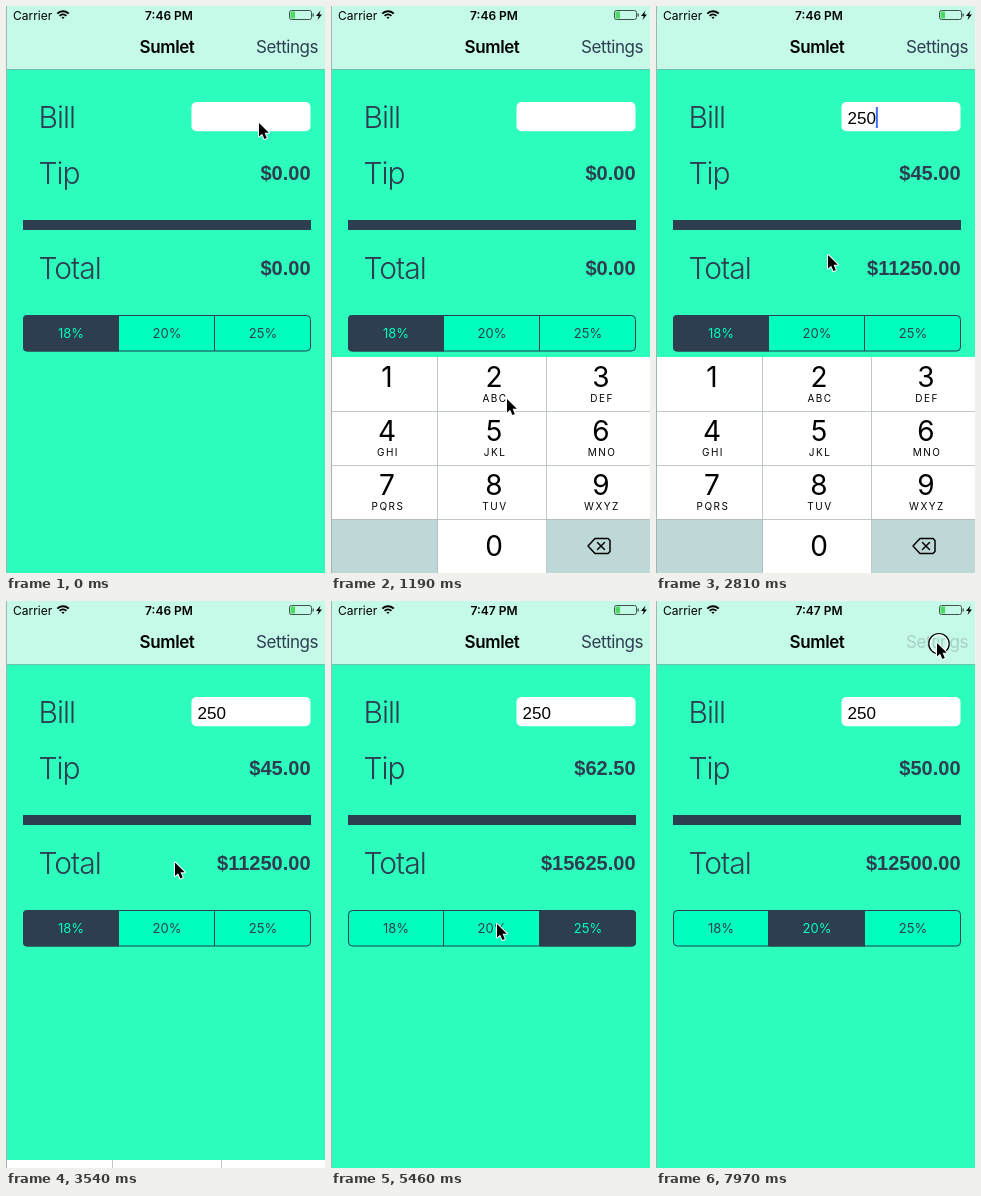
An HTML page with a canvas for the animation above (8 s loop, 319 px wide and 567 px high).

```html
<!DOCTYPE html>
<html lang="en">
<head>
<meta charset="utf-8">
<title>Tip calculator</title>
<style>
  html, body { margin: 0; width: 100%; height: 100%; overflow: hidden; background: #2cfdbd; }
  canvas { display: block; width: 319px; height: 567px; }
</style>
</head>
<body>
<canvas id="stage"></canvas>
<script>
const W = 319, H = 567, LOOP = 8000, STEP = 147.6;
const MINT = '#2cfdbd', LIGHT = [0, 255, 190], DARK = [44, 62, 80];
const INK = 'rgb(44,62,80)', HAIR = '#b3b9b9', GREY = '#bdd8d7';
const UI = 'Inter, "Open Sans", sans-serif';
const HELV = '"Liberation Sans", Arial, sans-serif';
const RATES = [0.18, 0.20, 0.25];
const LETTERS = ['', 'ABC', 'DEF', 'GHI', 'JKL', 'MNO', 'PQRS', 'TUV', 'WXYZ'];
const KEY_TOP = 351, KEY_H = 54, SEG_TOP = 309, SEG_W = 96;

const canvas = document.getElementById('stage');
const c = canvas.getContext('2d');
const dpr = window.devicePixelRatio || 1;
canvas.width = Math.round(W * dpr);
canvas.height = Math.round(H * dpr);

const keyLeft = col => 1 + Math.round(col * 107.5 - (col === 1 ? 2 : 0));
const keyMid = col => 56 + col * 107;
const digitCell = d => d ? [(d - 1) % 3, Math.floor((d - 1) / 3)] : [1, 3];

// everything that happens follows from these taps
const tap = (at, x, y, act = {}) => ({ at, x, y, ...act });
const keyTap = (at, digit) => {
  const [col, row] = digitCell(digit);
  return tap(at, keyMid(col) + 13, KEY_TOP + row * KEY_H + 42, { digit });
};
const segTap = (at, seg, dx = 0, dy = 0) =>
  tap(at, 60 + seg * SEG_W + dx, 324 + dy, { seg });

const TAPS = [
  tap(1, 253, 117, { focus: true }),
  keyTap(9, 2), keyTap(12, 5), keyTap(15, 0),
  tap(22, 172, 247, { blur: true }),
  segTap(30, 1), segTap(34, 2), segTap(38, 1, 10, -1), segTap(43, 0), segTap(46, 1, 1, -7),
  tap(54, 281, 42, { settings: true })
];
const focusAt = TAPS.find(e => e.focus).at;
const blurAt = TAPS.find(e => e.blur).at;
const picks = [{ at: -9, seg: 0 }, ...TAPS.filter(e => 'seg' in e)];

const clamp = u => Math.max(0, Math.min(1, u));
const smooth = u => { u = clamp(u); return u * u * (3 - 2 * u); };
const easeOut = u => 1 - (1 - clamp(u)) ** 3;
const mix = (a, b, p) => 'rgb(' + a.map((v, i) => Math.round(v + (b[i] - v) * p)).join(',') + ')';

function text(s, x, y, font, color, align = 'left', spacing = 0) {
  c.font = font;
  c.fillStyle = color;
  c.textAlign = align;
  c.letterSpacing = spacing + 'px';
  c.fillText(s, x, y);
  c.letterSpacing = '0px';
}

function rect(x, y, w, h, color) {
  c.fillStyle = color;
  c.fillRect(x, y, w, h);
}

function roundRect(x, y, w, h, r) {
  c.beginPath();
  c.roundRect(x, y, w, h, r);
}

function poly(...pts) {
  c.beginPath();
  for (const [x, y] of pts) c.lineTo(x, y);
}

function stroke(color, width) {
  c.strokeStyle = color;
  c.lineWidth = width;
  c.stroke();
}

function ring(x, y, r, color, width) {
  c.beginPath();
  c.arc(x, y, r, 0, Math.PI * 2);
  stroke(color, width);
}

function statusBar(n) {
  rect(0, 0, W, 63, '#c5f9e8');
  rect(0, 63, W, 1, '#6cc3a6');
  text('Carrier', 7, 14, '12px ' + UI, '#000');
  text(n < 27 ? '7:46 PM' : '7:47 PM', 163, 14, '600 12px ' + UI, '#000', 'center');

  for (const r of [1.2, 4.6, 7.8]) {
    c.beginPath();
    c.arc(57, 13, r, -Math.PI * 0.76, -Math.PI * 0.24);
    stroke('#000', 1.9);
  }

  roundRect(283.5, 4.5, 22, 9, 2);
  stroke('#40534d', 1);
  rect(284.5, 5.5, 4.5, 7, '#4cd964');
  rect(306.5, 7.5, 1.3, 3, '#40534d');
  c.fillStyle = '#000';
  poly([314.5, 4.5], [310, 10], [312.7, 10], [311.5, 14], [316, 8.4], [313.3, 8.4]);
  c.fill();

  const pressed = TAPS.some(e => e.settings && n >= e.at);
  text('Sumlet', 161, 47, '600 17px ' + UI, '#000', 'center', -0.4);
  text('Settings', 312, 47, '17px ' + UI, pressed ? '#a8cfc6' : INK, 'right', -0.45);
}

function segments(n) {
  const k = picks.findLastIndex(e => e.at <= n);
  const { at, seg } = picks[k];
  const last = k ? picks[k - 1].seg : seg;
  const p = smooth((n - at + 1) * 0.42);

  c.save();
  roundRect(17, SEG_TOP, 288, 36.5, 4);
  c.clip();
  RATES.forEach((rate, i) => {
    const on = i === seg ? p : i === last ? 1 - p ** 1.5 : 0;
    rect(17 + i * SEG_W, SEG_TOP, SEG_W, 37, mix(LIGHT, DARK, on));
    text(Math.round(rate * 100) + '%', 65 + i * SEG_W, 332, '13px ' + UI,
      mix(DARK, LIGHT, on), 'center');
  });
  c.restore();
  roundRect(17.5, SEG_TOP + 0.5, 287, 35.5, 4);
  stroke(INK, 1);
  for (const i of [1, 2]) rect(16 + i * SEG_W, SEG_TOP, 1, 36, INK);
  return RATES[seg];
}

function form(n) {
  const label = (s, y) => text(s, 32.5, y, '300 30px ' + UI, INK, 'left', -1);
  label('Bill', 122);
  label('Tip', 178);
  label('Total', 273);
  rect(17, 214, 288, 10, INK);

  c.fillStyle = '#fff';
  roundRect(185.5, 96, 119, 29.3, 5);
  c.fill();

  const typed = TAPS.filter(e => 'digit' in e && e.at < n).map(e => e.digit).join('');
  text(typed, 191.5, 117.5, '17px ' + HELV, '#000');
  const blinkOff = n > focusAt + 4 && n < focusAt + 8;
  if (n > focusAt + 1 && n < blurAt && !blinkOff) {
    rect(191.5 + c.measureText(typed).width, 101, 2, 21, '#426bf2');
  }

  const bill = Number(typed);
  const tip = bill * segments(n);
  const amount = (v, y) => text('$' + v.toFixed(2), 304.5, y, 'bold 20px ' + HELV, INK, 'right');
  amount(tip, 174);
  amount(bill * tip, 269);
}

function deleteIcon(x, y) {
  c.lineJoin = c.lineCap = 'round';
  poly([x - 11, y], [x - 4, y - 7.5], [x + 9, y - 7.5], [x + 11, y - 5.5],
    [x + 11, y + 5.5], [x + 9, y + 7.5], [x - 4, y + 7.5]);
  c.closePath();
  stroke('#000', 1.5);
  for (const s of [-1, 1]) {
    poly([x - 1.5, y - 3.5 * s], [x + 5.5, y + 3.5 * s]);
    stroke('#000', 1.5);
  }
  c.lineCap = 'butt';
}

function keyboard(n) {
  const shown = easeOut((n - focusAt - 1) / 3) - easeOut((n - blurAt) / 3);
  if (shown <= 0) return;
  const held = TAPS.find(e => e.at === n)?.digit;

  c.save();
  c.translate(0, (H - KEY_TOP) * (1 - shown));
  rect(1, KEY_TOP, W, H - KEY_TOP, GREY);
  for (let d = 0; d < 10; d++) {
    const [col, row] = digitCell(d);
    const top = KEY_TOP + row * KEY_H, mid = keyMid(col);
    if (d !== held) rect(keyLeft(col), top, keyLeft(col + 1) - keyLeft(col), KEY_H, '#fff');
    text(d, mid, top + (d ? 30 : 37), '28px ' + UI, '#000', 'center');
    if (d) text(LETTERS[d - 1], mid + 1, top + 45, '10px ' + UI, '#000', 'center', 1.5);
  }
  deleteIcon(268, 540);
  for (const i of [1, 2, 3]) rect(1, KEY_TOP + i * KEY_H, W, 0.8, HAIR);
  for (const i of [1, 2]) rect(keyLeft(i) - 1, KEY_TOP, 0.8, H - KEY_TOP, HAIR);
  c.restore();
}

function pointer(n) {
  // rest one step after a tap, then glide to the next one and wait there
  const i = Math.max(1, TAPS.findIndex(e => e.at >= n));
  const a = TAPS[i - 1], b = TAPS[i];
  const p = smooth((n - a.at - 1) / ((b.at - a.at) * 0.45));
  const x = a.x + (b.x - a.x) * p, y = a.y + (b.y - a.y) * p;

  if (TAPS.some(e => e.at === n)) {
    ring(x + 2, y + 0.7, 8.9, '#fff', 1.5);
    ring(x + 2, y + 0.7, 10.2, '#000', 1.2);
  }
  c.save();
  c.translate(x, y);
  poly([0, 0], [0, 13.5], [3.1, 10.7], [5.4, 16], [7.8, 15], [5.6, 9.8], [9.8, 9.8]);
  c.closePath();
  c.lineJoin = 'round';
  stroke('#fff', 2);
  c.fillStyle = '#000';
  c.fill();
  c.restore();
}

function draw(t) {
  const n = Math.floor((t % LOOP + 10) / STEP);
  c.setTransform(dpr, 0, 0, dpr, 0, 0);
  c.textBaseline = 'alphabetic';
  rect(0, 0, W, H, MINT);
  statusBar(n);
  form(n);
  keyboard(n);
  rect(0, 0, 1, H, '#a3b5b0');
  pointer(n);
}

const begin = performance.now();
function tick() {
  draw(performance.now() - begin);
  requestAnimationFrame(tick);
}
tick();
</script>
</body>
</html>
```
